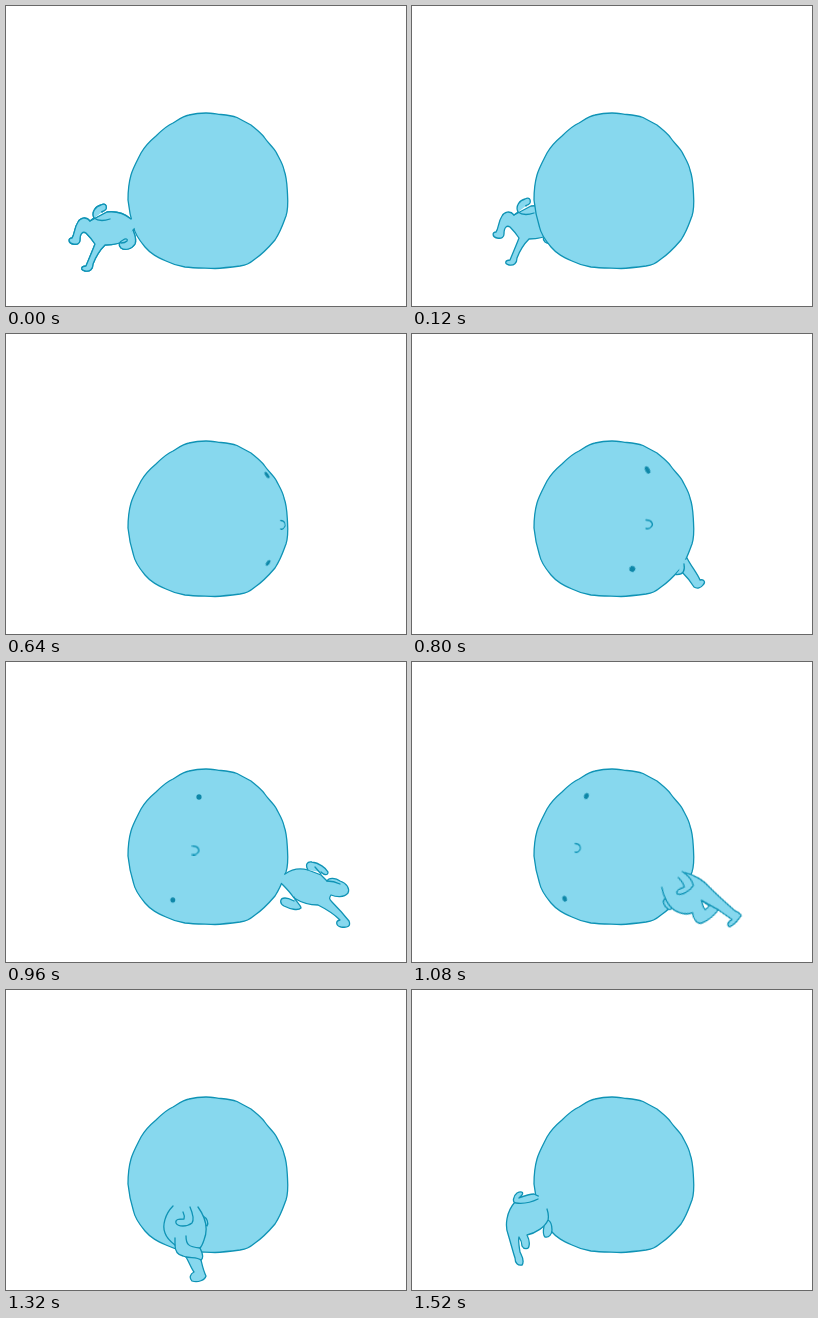
Recreate the animation shown at these times as an HTML page without scripts. Size 400 by 300 pixels, loop 1560 ms.

```html
<!DOCTYPE html>
<html lang="en">
<head>
<meta charset="utf-8">
<title>Running round the head</title>
<style>
  html, body { margin: 0; width: 100%; height: 100%; overflow: hidden; background: #fff; }
  svg { display: block; width: 100vw; height: 100vh; }

  path { fill: none; stroke: #0f93b5; stroke-width: 1.3; stroke-linecap: round; stroke-linejoin: round; }
  .skin { fill: #87d8ee; }
  .gap { fill: #fff; }
  .join { stroke: #87d8ee; stroke-width: 3; stroke-linecap: butt; }
  ellipse { fill: #0e87a8; }

  .move { opacity: 0; animation: 1.56s step-end infinite; }

  /* face turning from right to left */
  .eye-top { animation-name: eye-top; }
  .eye-low { animation-name: eye-low; }
  .mouth { animation-name: mouth; }
  @keyframes eye-top {
    0% { opacity: 0; }
    41% { opacity: 1; transform: translate(261px, 141px) rotate(-35deg) scale(.6, 1.3); animation-timing-function: steps(4); }
    51.2% { opacity: 1; transform: translate(235.5px, 136px) rotate(-28deg) scale(.85, 1.4); animation-timing-function: steps(4); }
    61.5% { opacity: 1; transform: translate(193px, 135px) rotate(0deg) scale(1, 1); animation-timing-function: steps(5); }
    74.3% { opacity: 1; transform: translate(162px, 133.5px) rotate(38deg) scale(.8, 1.2); animation-timing-function: steps(3); }
    82% { opacity: 1; transform: translate(149px, 130px) rotate(42deg) scale(.5, 1.2); }
    82.01%, 100% { opacity: 0; }
  }
  @keyframes eye-low {
    0% { opacity: 0; }
    41% { opacity: 1; transform: translate(262px, 229px) rotate(35deg) scale(.6, 1.2); animation-timing-function: steps(4); }
    51.2% { opacity: 1; transform: translate(220.3px, 235px) rotate(30deg) scale(1.1, 1.1); animation-timing-function: steps(4); }
    61.5% { opacity: 1; transform: translate(166.8px, 238px) rotate(0deg) scale(.95, .95); animation-timing-function: steps(5); }
    74.3% { opacity: 1; transform: translate(143.3px, 236px) rotate(-32deg) scale(.75, 1.2); animation-timing-function: steps(3); }
    82% { opacity: 1; transform: translate(134px, 231px) rotate(-35deg) scale(.5, 1.2); }
    82.01%, 100% { opacity: 0; }
  }
  @keyframes mouth {
    0% { opacity: 0; }
    41% { opacity: 1; transform: translate(276px, 191px) scaleX(.7); animation-timing-function: steps(4); }
    51.2% { opacity: 1; transform: translate(236px, 190.5px) scaleX(1); animation-timing-function: steps(4); }
    61.5% { opacity: 1; transform: translate(188.5px, 188.5px) scaleX(1); animation-timing-function: steps(5); }
    74.3% { opacity: 1; transform: translate(149px, 184.5px) scaleX(.7); animation-timing-function: steps(3); }
    82% { opacity: 1; transform: translate(130px, 182px) scaleX(.4); }
    82.01%, 100% { opacity: 0; }
  }

  /* body circling the head */
  .leave-front { animation-name: leave-front; }
  @keyframes leave-front { 0% { opacity: 1; } 2.5%, 100% { opacity: 0; } }

  .leave-rear { animation-name: leave-rear; }
  @keyframes leave-rear {
    0% { opacity: 1; transform: translate(0, 0); animation-timing-function: steps(4); }
    10.2% { opacity: 1; transform: translate(24px, -8px); animation-timing-function: steps(4); }
    20.5% { opacity: 1; transform: translate(68px, -24px); }
    20.51%, 100% { opacity: 0; }
  }

  .kick { animation-name: kick; }
  @keyframes kick {
    0% { opacity: 0; }
    46.1% { opacity: 1; transform: translate(-14px, -7px); }
    48.7% { transform: translate(-7px, -3px); }
    51.2% { transform: none; }
    53.8%, 100% { opacity: 0; }
  }
  .hand { animation-name: hand; }
  @keyframes hand { 0%, 53.8%, 100% { opacity: 0; } 51.2% { opacity: 1; } }

  .enter-rear { animation-name: enter-rear; }
  @keyframes enter-rear {
    0% { opacity: 0; }
    53.8% { opacity: 1; transform: translate(-37px, -2px); }
    56.4% { transform: translate(-23px, -1px); }
    58.9% { transform: translate(-10px, 0); }
    61.5%, 100% { opacity: 0; }
  }
  .enter-front { animation-name: enter-front; transform-origin: 279px 216px; }
  @keyframes enter-front {
    0% { opacity: 0; }
    61.5% { opacity: 1; transform: none; }
    64.1% { transform: translate(-3px, 2px) rotate(8deg); }
    66.6% { transform: translate(-8px, 3px) rotate(17deg); }
    69.2%, 100% { opacity: 0; }
  }

  .turn { animation-name: turn; transform-origin: 245px 220px; }
  @keyframes turn {
    0% { opacity: 0; }
    69.2% { opacity: 1; transform: translate(25px, -6px) rotate(-22deg); }
    71.7% { transform: translate(13px, -2px) rotate(-11deg); }
    74.3% { transform: none; }
    76.9% { transform: translate(-14px, 2px) rotate(7deg); }
    79.4%, 100% { opacity: 0; }
  }
  .cross { animation-name: cross; transform-origin: 180px 220px; }
  @keyframes cross {
    0% { opacity: 0; }
    79.4% { opacity: 1; transform: translate(31px, -2px) rotate(-6deg); }
    82% { transform: translate(15px, -1px) rotate(-3deg); }
    84.6% { transform: none; }
    87.1% { transform: translate(-14px, 0) rotate(4deg); }
    89.7% { transform: translate(-27px, -2px) rotate(8deg); }
    92.3%, 100% { opacity: 0; }
  }
  .round { animation-name: round; transform-origin: 125px 215px; }
  @keyframes round {
    0% { opacity: 0; }
    92.3% { opacity: 1; transform: translate(22px, 9px) rotate(-12deg); }
    94.8% { transform: translate(11px, 4px) rotate(-6deg); }
    97.4%, 100% { opacity: 1; transform: none; }
  }
</style>
</head>
<body>
<svg viewBox="0 0 400 300">
  <defs>
    <path id="head" class="skin" d="M200 107 C205 107 210 108 215 108.500 C221 109 227 110 231 111.500 L245 119 C251 124 255 127 258 131 C262 137 267 141 270 146 C273 152 277 158 278 164 C281 172 281 180 281.500 188 C282 196 282 204 280 210 C277 218 275 225 269 234 C263 241 255 249 249 253 C243 258 240 259 234 260 C226 261 218 262 209 262.500 C198 262 188 262 179 261 C172 260 166 258 160 255 C151 251 145 248 139 241 C134 235 129 229 127.500 221 C125 213 123 204 122 194 C122 184 123 176 125 169 C127 162 131 155 135 147 C139 140 144 135 150 130 C155 125 160 120 167 117 C172 114 177 110 183 109 C189 107.500 195 107 200 107 Z"/>
    <clipPath id="inside"><use href="#head"/></clipPath>

    <g id="leaving">
      <path class="skin" d="M125 213 C119 208 110 205 101 206 L84 215 C80 210 74 212 72 216 C68 222 69 228 66 232 C62 232 62 237 67 238 C72 239 74 237 74 234 C74 227 77 225 80 227 C84 231 87 235 89 238 C86 246 82 255 80 260 C75 260 74 264 79 265 C84 266 87 263 87 258 C90 250 95 243 99 239 C107 239 116 237 122 233 L128 223"/>
      <path class="skin" d="M88 212 C85 206 90 200 95 199 C99 197 101 199 100 203 C98 206 95 205 96 206"/>
      <path d="M84 215 L88 212 C92 215 98 215 104 213"/>
      <path class="skin" d="M127 224 C129 229 131 234 129 238 C126 243 119 245 115 242 C112 239 113 236 117 234 C120 232 122 233 121 235 C119 237 117 237 115 237"/>
    </g>

    <g id="entering">
      <path class="skin" d="M279 212 C286 207 295 206 302 208 L315 213 L321 219 C323 215 330 216 334 219 C341 221 344 227 342 231 C338 236 330 235 325 233 C323 236 323 237 326 240 C332 246 339 254 343 259 C345 264 342 266 335 265 C330 264 329 259 334 258 C328 252 318 246 312 243 C304 243 296 241 288 236 C284 230 279 225 276 222"/>
      <path class="skin" d="M302 208 C299 203 301 199 306 200 C313 201 320 206 322 210 C322 214 318 213 315 210"/>
      <path d="M309 205 L315 212 M321 219 C326 219 330 220 334 222"/>
      <path class="skin" d="M288 235 C290 240 295 243 295 246 C292 249 284 247 278 244 C273 241 274 236 279 236 C283 236 286 238 288 239"/>
    </g>
  </defs>

  <use class="move leave-rear" href="#leaving"/>
  <use class="move enter-rear" href="#entering"/>
  <path class="move kick skin" d="M275 224 C279 232 285 239 288 246 C292 245 294 248 291 251 C289 254 285 255 282 253 C279 248 275 243 270 238"/>

  <use href="#head"/>

  <g clip-path="url(#inside)">
    <ellipse class="move eye-top" rx="2.6" ry="2.8"/>
    <ellipse class="move eye-low" rx="2.6" ry="2.7"/>
    <path class="move mouth" d="M-2 -4.500 C4 -4.500 6 0 3 2.500 C2 4 0 4.500 -2 4"/>
  </g>

  <g class="move leave-front">
    <path class="join" d="M125.500 213 L128 222"/>
    <use href="#leaving"/>
  </g>

  <g class="move hand">
    <path class="join" d="M274 226 L268 236"/>
    <path class="skin" d="M272 230 C273 236 272 241 264 240.500"/>
  </g>

  <g class="move enter-front">
    <path class="join" d="M279 213 L276 221"/>
    <use href="#entering"/>
  </g>

  <g class="move turn">
    <path class="skin" d="M221 235 C217 235 217 240 219 244 C220 247 222 247 224 246"/>
    <path class="skin" d="M222 223 C220 232 221 244 226 250 C231 256 237 258 241 258 C239 264 241 271 246 271 C254 271 261 268 266 265 C269 270 272 274 275 279 C270 280 268 282 270 285 C277 285 281 281 285 279 C285 277 284 275 281 272 C276 262 270 250 266 240 C264 234 258 224 249 218"/>
    <path class="gap" d="M254 250 C253 255 253 258 254 260 L259 258 Z"/>
    <path d="M254 250 L266 265 M247 216 C251 222 253 228 252 233 C247 237 237 238 234 235 C233 231 238 231 243 231 C244 227 242 223 241 220"/>
  </g>

  <g class="move cross">
    <path class="skin" d="M197 226 C201 228 203 233 201 236 L198 234"/>
    <path class="skin" d="M167 216 C159 224 156 236 159 243 C161 249 165 252 169 255 C169 262 172 265 177 266 L180 267 C183 272 185 278 188 282 C184 284 183 288 186 291 C192 293 199 290 200 286 C197 280 196 274 195 270 C198 268 196 262 194 258 C196 256 197 253 198 250 C202 240 200 228 192 217"/>
    <path d="M169 248 V255 M180 246 C180 254 182 257 194 258 M180 267 C186 268 192 267 195 270"/>
    <path d="M184 217 C187 224 188 230 186 233 C181 237 172 237 170 233 C169 229 173 229 178 229 C179 226 178 224 177 222"/>
  </g>

  <g class="move round">
    <path class="skin" d="M132 236 C131 241 131 245 133 247 C137 248 140 244 140 240 C140 235 138 231 136 230"/>
    <path class="skin" d="M126 206 L103 212 C94 222 93 236 96 244 C99 254 101 262 103 268 C103 273 106 276 110 275 C113 271 110 266 108 262 C107 256 106 250 107 247 C109 250 110 252 110 256 C112 260 117 259 117 256 C118 252 117 249 115 245 C124 243 133 237 136 230 C137 226 136 222 135 219"/>
    <path class="skin" d="M126 209 C120 212 112 214 104 213 C100 213 101 206 105 203 C109 201 112 202 110 205 L107 208 C112 206 117 204 122 204 L126 206"/>
  </g>
</svg>
</body>
</html>
```
